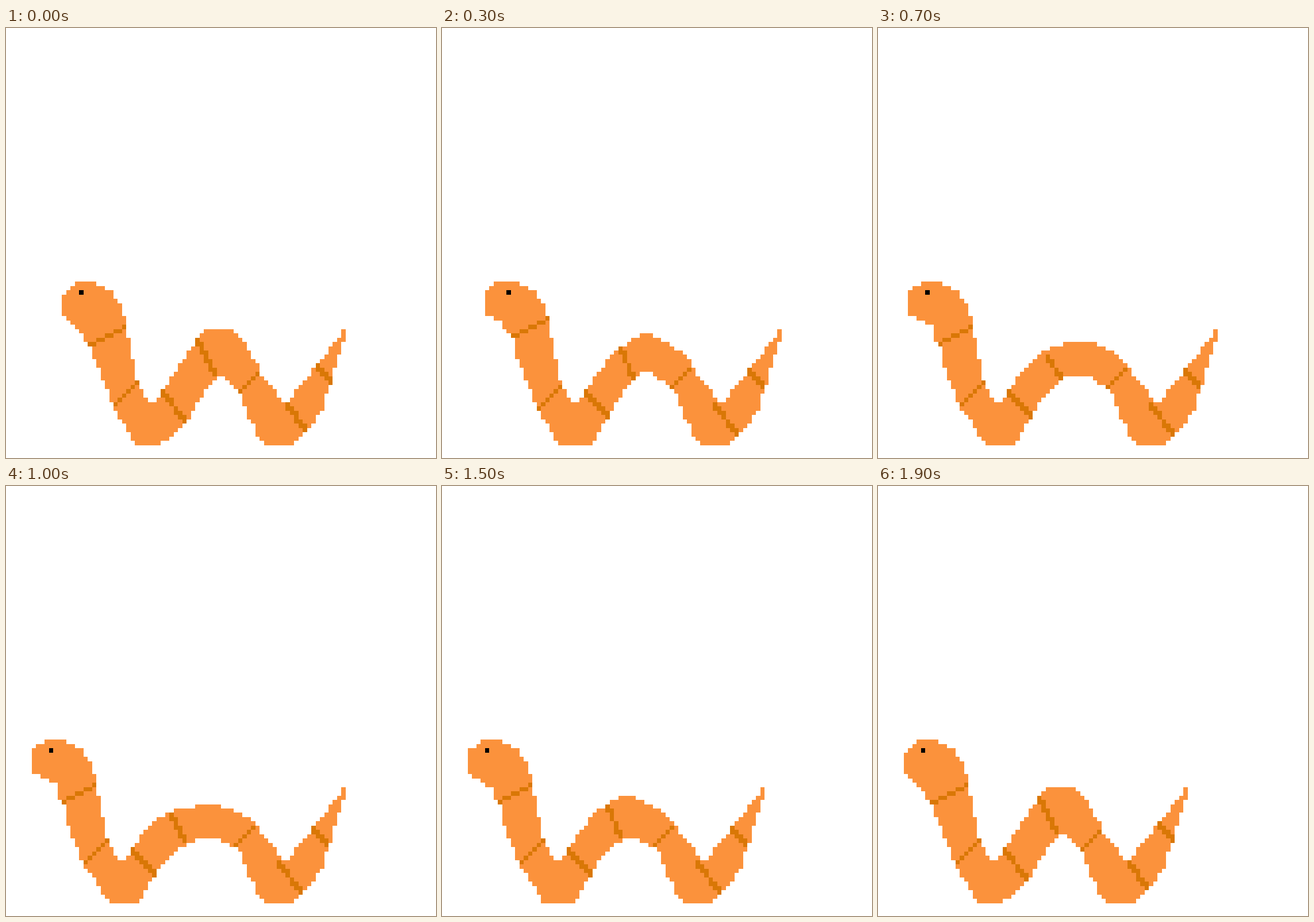
These frames come from a looping animation (748x748 px, 2000 ms). An HTML page with a canvas:

```html
<!DOCTYPE html>
<html lang="en">
<head>
<meta charset="utf-8">
<title>Inching worm</title>
<style>
  html, body { margin: 0; width: 100%; height: 100%; overflow: hidden; background: #fff; }
  canvas { display: block; width: 100%; height: 100%; image-rendering: pixelated; }
</style>
</head>
<body>
<canvas id="stage" width="100" height="100"></canvas>
<script>
const ctx = document.getElementById('stage').getContext('2d');
const BODY = '#fb923c', BAND = '#d97706';

const mix = (a, b, k) => Array.isArray(a) ? a.map((v, i) => mix(v, b[i], k)) : a + (b - a) * k;
const clamp = (v, lo, hi) => Math.min(hi, Math.max(lo, v));
const shift = (points, dx) => points.map(([x, y]) => [x + dx, y]);

// Points of a quadratic curve.
const curve = (a, b, c) => Array.from({ length: 9 }, (_, i) => mix(mix(a, b, i / 8), mix(b, c, i / 8), i / 8));

// Back of the neck, from the first dip up to the crown.
const nape = [[36, 84], [36, 85], [35, 86.5], [33, 86.5], [32, 84.5], [30.4, 81], [29.6, 77],
  [28.6, 73], [28, 67], [27.4, 66.5], [27, 64], [25.2, 62], [25, 61], [21, 59]];

// Rear leg, tail and second dip.
const rear = [[54, 84], [55, 86], [56.2, 90], [58, 92], [58.3, 94], [60, 96.5],
  [67, 96.5], [72, 91], [72.3, 90], [74, 88], [74.4, 85], [76, 82], [76.3, 79],
  [79, 71.5], [79, 70], [78, 70], [78, 71], [75, 74.3], [74, 76],
  [71, 79.5], [67, 84], [66, 86.5], [64, 86.5], [62, 83]];

// Arch: time, outer crest (left, right, y), inner crest (left, right, y), band (x, y, x, y).
const arch = [
  [0, 46, 53, 70, 49, 51, 81, 44, 72, 48, 80],
  [300, 46, 49, 71, 46, 49, 80, 41, 74, 44, 81],
  [700, 43, 51, 73, 43, 50, 81, 39, 76, 42, 81],
  [1000, 44, 50, 74, 44, 50, 82, 38, 76, 41, 82],
  [1100, 44, 50, 74, 44, 50, 82, 38, 76, 41, 82],
  [1300, 42, 46, 73, 43, 49, 82, 38, 76, 41, 82],
  [1500, 41, 45, 72, 42, 46, 82, 38, 74, 41, 81],
  [1900, 39, 46, 70, 42, 44, 81, 37, 72, 41, 80]];

function archAt(t) {
  const i = Math.max(1, arch.findIndex(key => key[0] >= t));
  const a = arch[i - 1], b = arch[i];
  return mix(a, b, (t - a[0]) / (b[0] - a[0]));
}

// Chin and throat down to the ground; the chin flattens with reach and rises with lift.
const throat = (reach, lift) => {
  const x = reach - lift, y = -2 * lift;
  return [[16 - lift, 59], [13, 62 - reach], [13, 66], [17, 70 - 2 * reach],
    [18 + x - lift, 71 - 2 * reach], [18 + x, 72 + y], [19 + x, 73 + y], [20 + x, 74 + y],
    [20 + x, 76 + x], [22, 80], [25, 87.5], [26 + x, 90], [28, 92], [30 + x, 96.5]];
};

function dot(x, y, color) {
  ctx.fillStyle = color;
  ctx.fillRect(Math.round(x), Math.round(y), 1, 1);
}

// Falling bands touch every cell they cross; rising ones take one cell per column.
function band(x0, y0, x1, y1) {
  const [a, b] = [[x0, y0], [x1, y1]].map(point => point.map(Math.round));
  const steps = b[1] > a[1] ? 60 : b[0] - a[0];
  for (let i = 0; i <= steps; i++) dot(...mix(a, b, i / steps), BAND);
}

// Whole-cell scanline fill.
function fill(points) {
  ctx.fillStyle = BODY;
  for (let row = 55; row < 98; row++) {
    const y = row + 0.01, hits = [];
    points.forEach(([x0, y0], i) => {
      const [x1, y1] = points[(i + 1) % points.length];
      if ((y0 <= y) !== (y1 <= y)) hits.push(Math.round(x0 + (x1 - x0) * (y - y0) / (y1 - y0)));
    });
    hits.sort((a, b) => a - b);
    for (let i = 0; i < hits.length; i += 2) ctx.fillRect(hits[i], row, hits[i + 1] - hits[i], 1);
  }
}

function draw(now) {
  const t = Math.floor(now % 2000 / 100) * 100;
  const head = t < 900 ? -Math.min(6, t / 100) : -7;
  const tail = -clamp((t - 1100) / 100, 0, 7);
  const reach = clamp(Math.min(t / 300, (1800 - t) / 500), 0, 1);
  const w = clamp(Math.min(t / 300, (1800 - t) / 300), 0, 1);
  const lift = clamp(Math.min(t / 300, (700 - t) / 400), 0, 1);
  const [, left, right, top, innerLeft, innerRight, innerTop, ...archBand] = archAt(t);

  const shin = [42 - w + head, 91], shoulder = [38 + head, 81.5], hip = [59.4 + tail, 80];
  const belly = [[35.5 + 2.5 * w + head, 96.5], [39 + w / 2 + head, 94],
    ...curve(shin, [shin[0] + 3.8, 83.8], [innerLeft, innerTop]), [innerRight, innerTop]];
  const back = [...curve(hip, [hip[0] - 2.4, top / 2 + 39], [right, top]),
    ...curve([left, top], [shoulder[0] + 4, 75], shoulder)];

  ctx.clearRect(0, 0, 100, 100);
  fill([...shift(throat(reach, lift), head), ...belly, ...shift(rear, tail), ...back, ...shift(nape, head)]);

  band(19 + reach - lift + head, 73 - 2 * lift, 27 + head, 69 - 2 * lift);
  band(25 + head, 87 + lift, 30 + head, 82 + lift);
  band(36 + head, 84, 41 + head, 91 - w);
  band(...archBand);
  band(54 - w + tail, 84 - w, 58 - w + tail, 80 - w);
  band(65 - 2 * w + tail, 87, 69 - w + tail, 93 + w);
  band(72 - w + tail, 78 + w, 75 - w + tail, 82 + w);
  dot(17 + lift + head, 61, '#000');
}

const start = performance.now();
function loop() {
  draw(performance.now() - start);
  requestAnimationFrame(loop);
}
loop();
</script>
</body>
</html>
```
